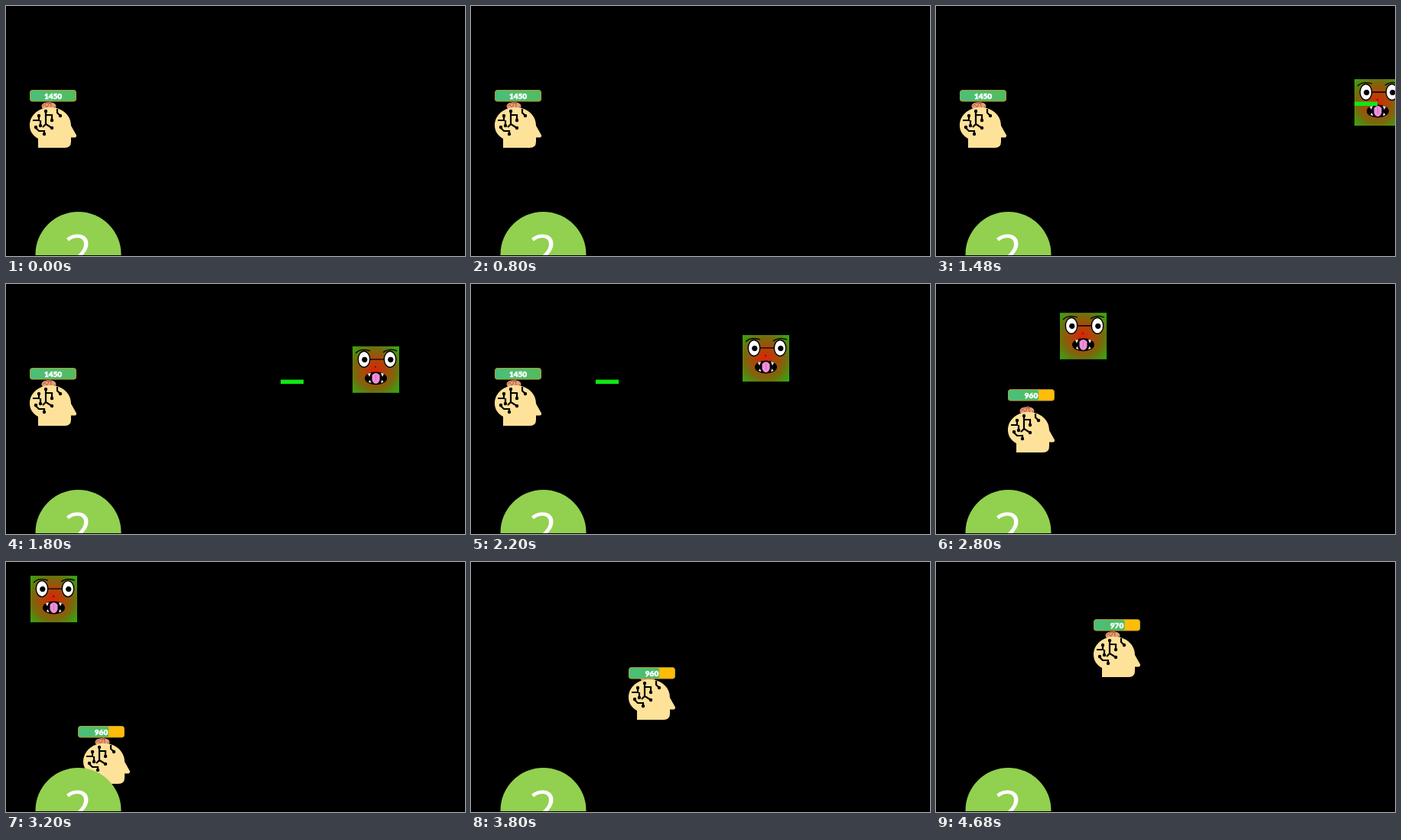
Write an HTML page that moves like this. It is 600 px wide and 328 px high and loops after 4.8 s.

```html
<!DOCTYPE html>
<html>
<head>
<meta charset="utf-8">
<style>
  html, body { margin: 0; width: 100%; height: 100%; overflow: hidden; background: #000; }
  svg { display: block; }
</style>
</head>
<body>
<svg width="600" height="328" viewBox="0 0 600 328">
  <defs>
    <radialGradient id="skin" cx=".48" cy=".5" r=".68">
      <stop offset="0" stop-color="#dc2404"/>
      <stop offset=".3" stop-color="#b24308"/>
      <stop offset=".65" stop-color="#776a0c"/>
      <stop offset="1" stop-color="#35a812"/>
    </radialGradient>
    <linearGradient id="life">
      <stop offset="0" stop-color="#48c07c"/>
      <stop offset="1" stop-color="#52bc60"/>
    </linearGradient>
    <g id="eye" stroke="#000">
      <ellipse rx="7.7" ry="10.5" fill="#fff" stroke-width="1.4"/>
      <circle cx=".8" cy=".5" r="3.2"/>
    </g>
  </defs>

  <g id="monster">
    <rect width="61" height="61" fill="url(#skin)"/>
    <g fill="none" stroke="#000" stroke-width="1.3">
      <path d="M4 9Q10 2 23 6M40 8Q48 2 58 6M23 17H41"/>
    </g>
    <use href="#eye" x="15" y="17"/>
    <use href="#eye" x="49" y="17"/>
    <circle cx="30" cy="27" r=".8"/>
    <ellipse cx="30.5" cy="42" rx="14.5" ry="8.5"/>
    <path d="M20 36l2 4 2-5zM37 35l2 5 2-4zM21 47l1.5-3 2 4zM37 48l1.5-4 2 3z" fill="#fff"/>
    <path d="M25.500 38Q30.500 32 35.500 38V44Q34 49 30.500 49T25.500 44Z" fill="#f090dc"/>
    <path d="M30.500 37V45" stroke="#c868b0" stroke-width=".8"/>
  </g>

  <g id="head">
    <ellipse cx="25" cy="6.500" rx="9.500" ry="5.500" fill="#e5a078"/>
    <path d="M17 7q2-5 4-1t4-3 3 4 5-1M20 3q5-2 9 0" fill="none" stroke="#b8583c"/>
    <path d="M11 61V49C4 45 0 39 0 32C0 18 12 8 27 8S54 18 54 32L61 44.500Q61.500 47 59 47.500H54V53Q54 61 46 61Z" fill="#ffe29a"/>
    <path d="M4 25H12V19M14 25V32M21 12V30L29 35M21 18H29V25M21 30L17 34M7 34L12 39H19V43M36 10V15L40 19" fill="none" stroke="#000" stroke-width="2.200"/>
    <path d="M12 19h0M14 32h0M21 13h0M29 25h0M29 35h0M8 34h0M19 43h0M40 19h0" stroke="#000" stroke-width="4.400" stroke-linecap="round"/>
  </g>

  <g id="bar">
    <rect x=".5" y=".5" width="60" height="14.500" rx="3" fill="#ffbc08"/>
    <rect id="fill" x=".5" y=".5" height="14.500" rx="3" fill="url(#life)"/>
    <rect x=".5" y=".5" width="60" height="14.500" rx="3" fill="none" stroke="#b89a2c"/>
    <text id="score" x="30.500" y="11.500" text-anchor="middle" fill="#fff" stroke="#fff" stroke-width=".5" font-family="Lato, sans-serif" font-weight="900" font-size="10"></text>
  </g>

  <circle cx="94.500" cy="326" r="56" fill="#92d050"/>
  <text x="94" y="347" text-anchor="middle" fill="#fff" font-family="'Open Sans', sans-serif" font-size="66">2</text>
  <rect y="327" width="600" height="1"/>
  <rect id="bullet" width="30" height="5.500" fill="#0ee814"/>
</svg>
<script>
const el = id => document.getElementById(id);
const monster = el("monster"), head = el("head"), bar = el("bar"),
      fill = el("fill"), score = el("score"), bullet = el("bullet");

// Keys are [step, value]; one step is a tenth of a second.
const monsterX = [[14, 579], [15, 547], [18, 453], [22, 355], [28, 162], [32, 32], [35, -65]];
const moveX = [[24, 0], [26.5, 9], [31.8, 9], [35.8, 25]];
const moveY = [[26.5, 0], [28, 5], [31.5, 15], [34.3, 15], [38, 3], [40.5, -5]];

function along(keys, s) {
  if (s <= keys[0][0]) return keys[0][1];
  for (let i = 1; i < keys.length; i++) {
    const [a, p] = keys[i - 1], [b, q] = keys[i];
    if (s <= b) return p + (q - p) * (s - a) / (b - a);
  }
  return keys[keys.length - 1][1];
}

function place(node, x, y, shown = true) {
  node.setAttribute("transform", `translate(${x} ${y})`);
  node.style.display = shown ? "" : "none";
}

// The player moves in jumps of 7 pixels.
const player = s => [31 + 7 * Math.round(along(moveX, s)), 110 + 7 * Math.round(along(moveY, s))];

function draw(now) {
  const t = now % 4800;
  const step = 2 * Math.floor(t / 200) + (t % 200 >= 80 ? 1 : 0);

  const mx = along(monsterX, step), gone = 547 - mx;
  place(monster, mx, 96 - gone * 0.1513, step >= 14 && step < 35);
  place(bullet, 547 - 2 * gone, 125.5, step >= 15 && step < 24);

  const [hx, hy] = player(step), [bx, by] = player(step - 0.3);
  place(head, hx, hy + 15);
  place(bar, bx, by); // the bar trails by one jump

  const points = step < 24 ? 1450 : step < 44 ? 960 : 970;
  score.textContent = points;
  fill.setAttribute("width", 60 * points / 1450);
  requestAnimationFrame(draw);
}
draw(performance.now());
</script>
</body>
</html>
```
